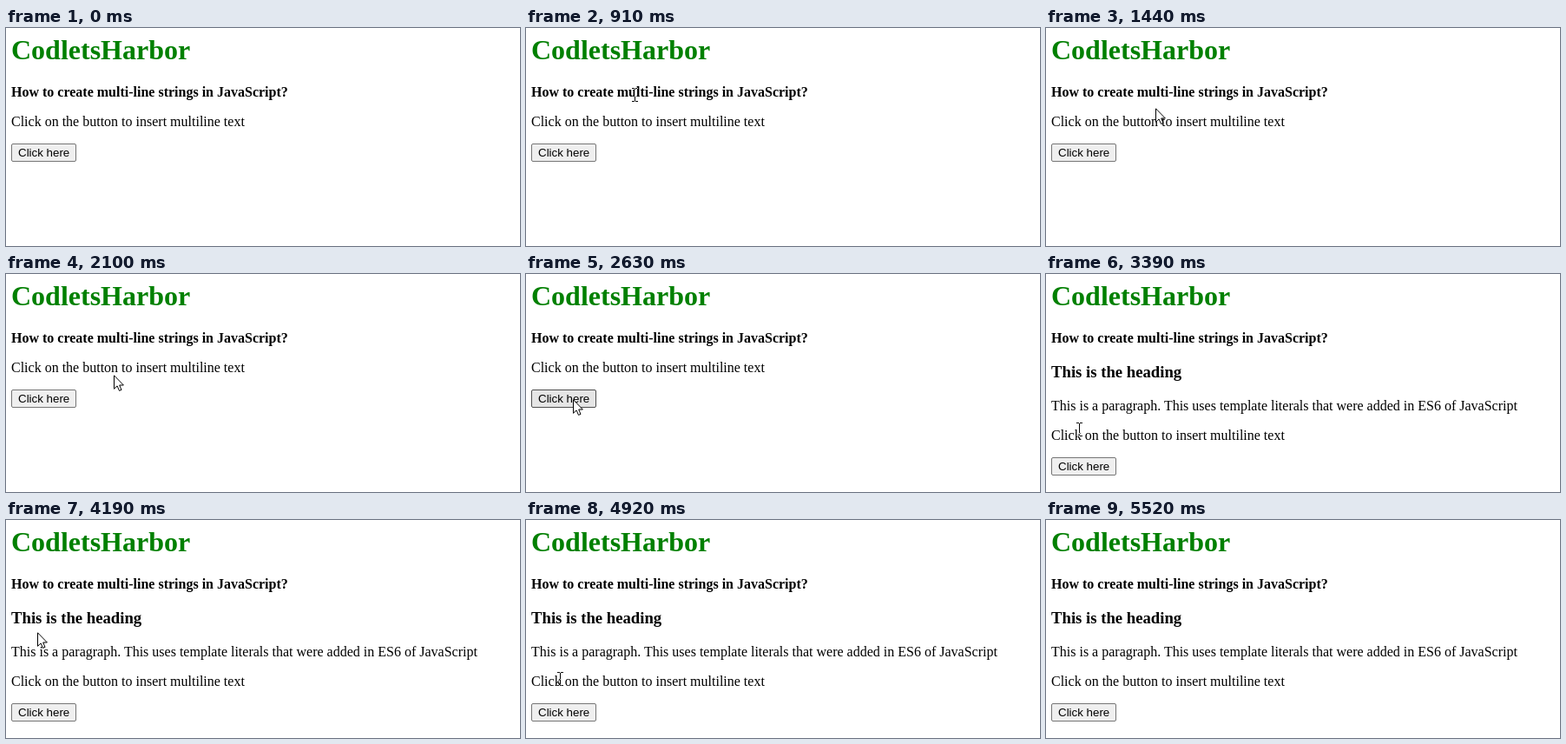
An HTML page for the animation above (6.52 s loop, 592 by 251 pixels).

```html
<!DOCTYPE html>
<html lang="en">
<head>
<meta charset="utf-8">
<title>Multi-line strings</title>
<style>
  html, body { margin: 0; width: 100%; height: 100%; overflow: hidden; background: #fff; }
  #stage {
    position: relative; width: 592px; height: 251px; overflow: hidden;
    background: #fff; color: #000; isolation: isolate; cursor: default;
    font: 16px/17px "Liberation Serif", "Times New Roman", serif;
  }
  #stage > * { position: absolute; left: 6px; margin: 0; white-space: nowrap; }
  h1 { top: 7px; font-size: 32px; line-height: 36px; color: green; }
  b { top: 65px; }
  h3 { top: 102px; font-size: 18.72px; line-height: 21px; }
  #para { top: 143px; }
  #hint { top: 99px; }
  #button {
    top: 133px; box-sizing: border-box; width: 75px; height: 21px; padding: 2px 0 0 7px;
    border: 1px solid #767676; border-radius: 2px; background: #efefef;
    font: 13.333px/15px "Liberation Sans", Arial, sans-serif;
  }
  #button.hover { background: #e5e5e5; border-color: #4f4f4f; }
  .added { display: none; }
  .clicked .added { display: block; }
  .clicked #hint { top: 177px; }
  .clicked #button { top: 211px; }
  #stage > svg { left: 0; top: 0; visibility: hidden; }
  #beam { mix-blend-mode: difference; }
</style>
</head>
<body>
<div id="stage">
  <h1 class="text">CodletsHarbor</h1>
  <b class="text">How to create multi-line strings in JavaScript?</b>
  <h3 class="text added">This is the heading</h3>
  <p class="text added" id="para">This is a paragraph. This uses template literals that were added in ES6 of JavaScript</p>
  <p class="text" id="hint">Click on the button to insert multiline text</p>
  <div id="button">Click here</div>
  <svg id="arrow" width="12" height="19">
    <path d="M.5 .8V16.3L4.1 12.9L6.5 18.4L9 17.4L6.7 12H11.4Z" fill="#fff" stroke="#000"/>
  </svg>
  <svg id="beam" width="7" height="16" shape-rendering="crispEdges">
    <path d="M0 0h3v1h1v-1h3v1h-3v14h3v1h-3v-1h-1v1h-3v-1h3v-14h-3z" fill="#fff"/>
  </svg>
</div>
<script>
  const LOOP = 6520, ENTER = 190, CLICK = 2770, WAKE = 2970, EXIT = 5520;
  const STEP = 66.6, FIRST = 180;
  const $ = id => document.getElementById(id);
  const stage = $('stage'), button = $('button'), arrow = $('arrow'), beam = $('beam');
  const texts = [...document.querySelectorAll('.text')];

  // Where the pointer turns or rests: time, x, y.
  const stops = [
    [FIRST, 435, 199], [780, 113, 71], [850, 113, 70], [910, 125, 77], [1440, 126, 92],
    [1578, 126, 94], [1850, 126, 94], [2100, 124, 116], [2310, 124, 116],
    [2630, 54, 144], [2910, 54, 144], [3245, 36, 194], [3380, 38, 179], [3580, 31, 155],
    [3950, 37, 118], [4180, 36, 129], [4250, 37, 138], [4650, 40, 185], [4920, 39, 183],
    [5110, 60, 216], [EXIT, 402, 249]
  ];

  const ease = u => u * u * (3 - 2 * u);

  function pointer(t) {
    const now = FIRST + Math.floor((t - FIRST) / STEP + 0.25) * STEP;
    const i = Math.max(1, stops.findIndex(s => s[0] > now));
    const [t0, x0, y0] = stops[i - 1], [t1, x1, y1] = stops[i];
    const k = ease((now - t0) / (t1 - t0));
    return [Math.round(x0 + (x1 - x0) * k), Math.round(y0 + (y1 - y0) * k)];
  }

  function hits(el, x, y) {
    const dx = x - el.offsetLeft, dy = y - el.offsetTop;
    return dx >= 0 && dx < el.offsetWidth && dy >= 0 && dy < el.offsetHeight;
  }

  function place(el, shown, x, y) {
    el.style.visibility = shown ? 'visible' : 'hidden';
    el.style.transform = `translate(${x}px, ${y}px)`;
  }

  function render(t) {
    stage.classList.toggle('clicked', t >= CLICK);
    const shown = t >= ENTER && t < EXIT;
    const [x, y] = shown ? pointer(t) : [-99, -99];
    // The pointer keeps its shape after the click until it moves.
    const resting = t >= CLICK && t < WAKE;
    const overText = !resting && texts.some(el => hits(el, x, y));
    button.classList.toggle('hover', hits(button, x, y));
    place(arrow, shown && !overText, x, y);
    place(beam, shown && overText, x - 3, y - 8);
  }

  function tick() {
    render(performance.now() % LOOP);
    requestAnimationFrame(tick);
  }
  tick();
</script>
</body>
</html>
```
